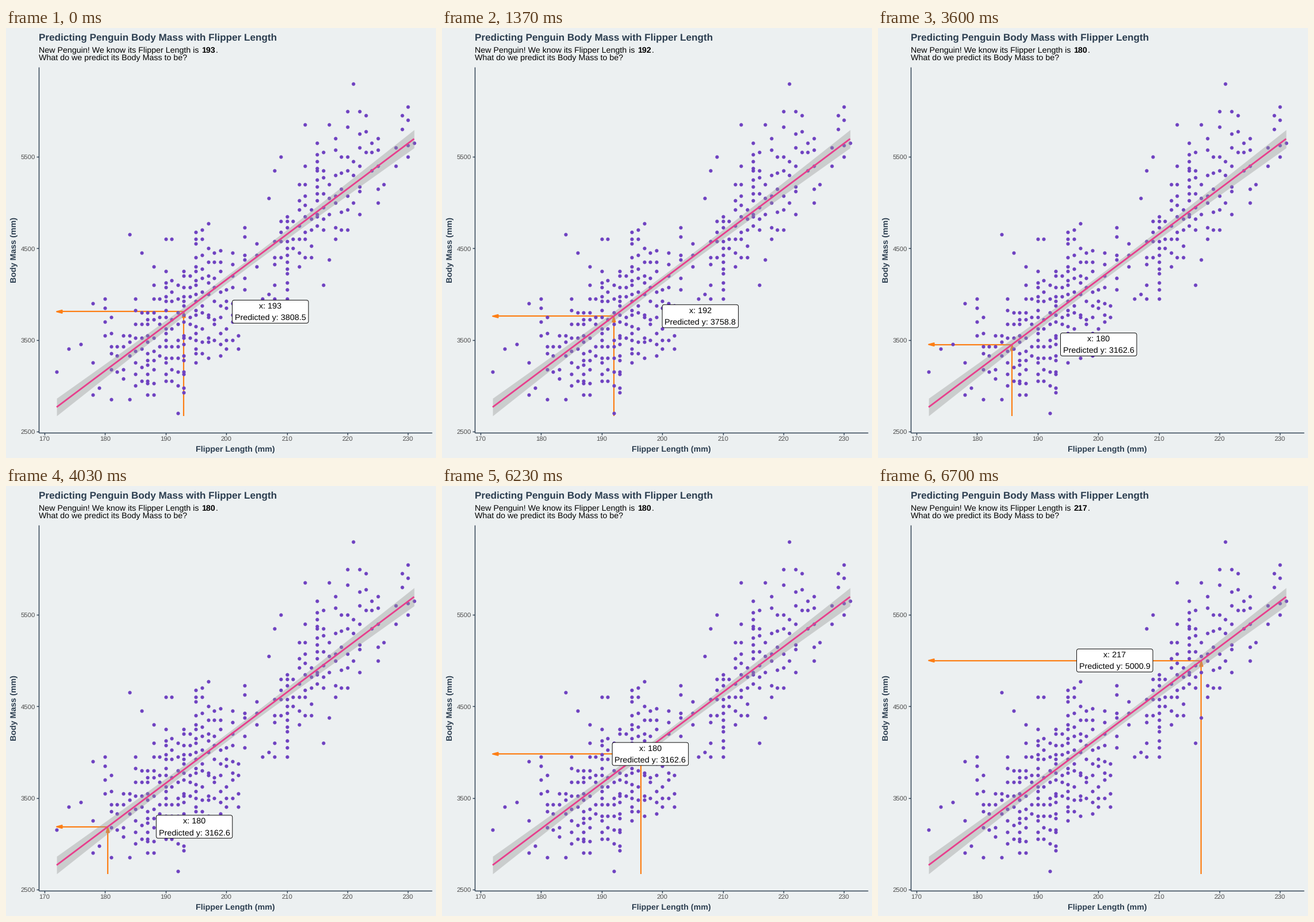
A matplotlib script that plays this animation: 748x748 px, repeating every 8000 ms.

```python
import numpy as np
import matplotlib.pyplot as plt
from matplotlib.animation import FuncAnimation
from matplotlib.patches import FancyBboxPatch, Polygon

SIZE = 748
FRAMES, LOOP_MS = 240, 8000
INK, PAPER = "#2c3e50", "#ecf0f1"
PURPLE, PINK, ORANGE = "#6f42c1", "#e83e8c", "#fd7e14"
SLOPE, INTERCEPT = 49.6856, -5780.83
FONT = 14.25

plt.rcParams.update({"font.family": "Liberation Sans", "text.hinting": "none"})


def px(x):
    return 67 + (x - 170) * 10.539


def py(mass):
    return 701.7 - (mass - 2500) * 0.1592


def predict(x):
    return INTERCEPT + SLOPE * x


# Mass range (low, high) of each flipper length, for runs of whole millimetres.
RANGES = {
    180: [(3550, 3950), (3175, 3750), (3150, 3425), (3075, 3550), (3325, 3550),
          (3000, 3950), (3050, 3800), (2900, 3800), (2900, 4100), (3325, 3950),
          (3050, 4250), (3050, 4150), (3000, 4100), (2925, 4250), (3525, 4200),
          (3250, 4675), (3350, 4700), (3300, 4500), (3500, 4450), (3325, 4475),
          (3400, 4050), (3500, 4450), (3400, 3875), (4050, 4625)],
    205: [(4300, 4550), (3950, 3950), (4000, 4000), (3950, 4575), (4400, 4800),
          (3950, 4850), (4500, 4800), (4300, 5200), (4400, 5400), (4400, 4925),
          (4750, 5650), (4700, 5550), (4875, 5200), (4600, 5700), (4700, 5500),
          (4700, 6000), (5000, 5450), (4875, 6000), (5550, 5950), (5350, 5650),
          (5000, 5700), (5200, 5200)],
    228: [(5400, 5600), (5800, 5950), (5500, 6050), (5650, 5650)],
}
CROWDED = {187, 190, 193, 195, 210, 215}
LONE = [(172, 3150), (174, 3400), (176, 3450), (178, 2900), (178, 3250),
        (178, 3900), (179, 2975), (181, 2850), (184, 2850), (184, 4650),
        (186, 4450), (188, 4300), (190, 4600), (191, 4600), (192, 2700),
        (197, 4775), (203, 4725), (207, 5050), (208, 5350), (209, 5500),
        (213, 5850), (216, 4100), (217, 5850), (217, 4375), (221, 6300)]


def make_penguins():
    rng = np.random.default_rng(7)
    points = list(LONE)
    for start, run in RANGES.items():
        for x, (low, high) in enumerate(run, start):
            gap = 85 if x in CROWDED else 200 if x > 216 else 140
            n = 1 + max(round((high - low) / gap), int(high > low))
            masses = np.linspace(low, high, n)
            masses[1:-1] += rng.uniform(-0.4, 0.4, max(n - 2, 0)) * gap
            points += [(x, 25 * round(m / 25)) for m in masses]
    return np.array(points, float)


fig = plt.figure(figsize=(SIZE / 72, SIZE / 72), dpi=72, facecolor=PAPER)
ax = fig.add_axes([0, 0, 1, 1])
ax.set(xlim=(0, SIZE), ylim=(SIZE, 0))
ax.axis("off")


def write(x, y, text, size=FONT, color="black", **kw):
    return ax.text(x, y, text, fontsize=size, color=color, va="baseline", **kw)


def stroke(xs, ys, color, width, z):
    return ax.plot(xs, ys, color=color, lw=width, zorder=z,
                   solid_capstyle="butt")[0]


# Axes and titles
stroke([57.3, 57.3], [68, 704.2], INK, 1.45, 0)
stroke([56.6, 741], [703.5, 703.5], INK, 1.45, 0)
for value in range(170, 231, 10):
    stroke([px(value)] * 2, [704, 707.7], INK, 1.4, 0)
    write(px(value), 718, str(value), 11.4, "#4d4d4d", ha="center")
for value in range(2500, 5501, 1000):
    stroke([53.3, 57], [py(value)] * 2, INK, 1.4, 0)
    write(50.8, py(value) + 4.2, str(value), 11.4, "#4d4d4d", ha="right")
write(57.5, 21, "Predicting Penguin Body Mass with Flipper Length", 17.1, INK,
      weight="bold")
write(399.3, 737, "Flipper Length (mm)", FONT, INK, weight="bold", ha="center")
write(18, 386, "Body Mass (mm)", FONT, INK, weight="bold", ha="center",
      rotation=90, rotation_mode="anchor")
write(57.5, 43, "New Penguin! We know its Flipper Length is ")
length_text = write(340.4, 43, "", weight="bold")
write(364.3, 43, ".")
write(57.5, 56, "What do we predict its Body Mass to be?")

# Points, confidence band and fitted line
penguins = make_penguins()
ax.scatter(px(penguins[:, 0]), py(penguins[:, 1]), s=6.2 ** 2, color=PURPLE,
           linewidths=0, zorder=2)
xs = np.linspace(172, 231, 80)
half = np.hypot(41.9, 2.987 * (xs - 200.9))
ax.fill_between(px(xs), py(predict(xs) - half), py(predict(xs) + half),
                color="#999999", alpha=0.4, lw=0, zorder=3)
stroke(px(xs), py(predict(xs)), PINK, 2.8, 4)

# Moving arrows and label
LEFT, BOTTOM = px(172), 675
rise = stroke([], [], ORANGE, 2.2, 1)
across = stroke([], [], ORANGE, 2.2, 1)
heads = [ax.add_patch(Polygon([(0, 0)] * 3, fc=ORANGE, ec=ORANGE, lw=2.1,
                              joinstyle="round", zorder=1)) for _ in range(2)]
BOX_W, BOX_H = 132.5, 40
box = ax.add_patch(FancyBboxPatch((0, 0), BOX_W, BOX_H, fc="white", ec="black",
                                  boxstyle="round,pad=0,rounding_size=3.6",
                                  lw=0.95, zorder=5))
label_x = write(0, 0, "", 14.4, ha="center", zorder=6)
label_y = write(0, 0, "", 14.4, ha="center", zorder=6)

STOPS = [(193, 150.5), (192, 150.5), (180, 150.5), (217, -150.5)]
STARTS = [15, 95, 175]
STEPS = 27


def pose(frame):
    """Flipper length, label offset and the value shown as text."""
    x, offset = STOPS[0]
    shown = x
    for start, a, b in zip(STARTS, STOPS, STOPS[1:]):
        t = min(max((frame - start + 1) / STEPS, 0), 1)
        if t > 0:
            x, offset = (p + (q - p) * t for p, q in zip(a, b))
            shown = b[0] if t > 0.5 else a[0]
    return x, offset, shown


def draw(frame):
    x, offset, shown = pose(frame)
    cx, cy = px(x), py(predict(x))
    rise.set_data([cx, cx], [BOTTOM, cy + 4])
    across.set_data([cx, LEFT + 4], [cy, cy])
    heads[0].set_xy([(cx, cy + 0.5), (cx - 2.5, cy + 10), (cx + 2.5, cy + 10)])
    heads[1].set_xy([(LEFT, cy), (LEFT + 9.5, cy - 2.5), (LEFT + 9.5, cy + 2.5)])

    mid = cx + offset
    box.set_bounds(mid - BOX_W / 2, cy - BOX_H / 2, BOX_W, BOX_H)
    label_x.set_position((mid, cy - 5.5))
    label_y.set_position((mid, cy + 15))
    label_x.set_text(f"x: {shown}")
    label_y.set_text(f"Predicted y: {predict(shown):.1f}")
    length_text.set_text(str(shown))
    return rise, across, *heads, box, label_x, label_y, length_text


anim = FuncAnimation(fig, draw, frames=FRAMES, interval=LOOP_MS / FRAMES,
                     repeat=True, repeat_delay=0)
plt.show()
```
